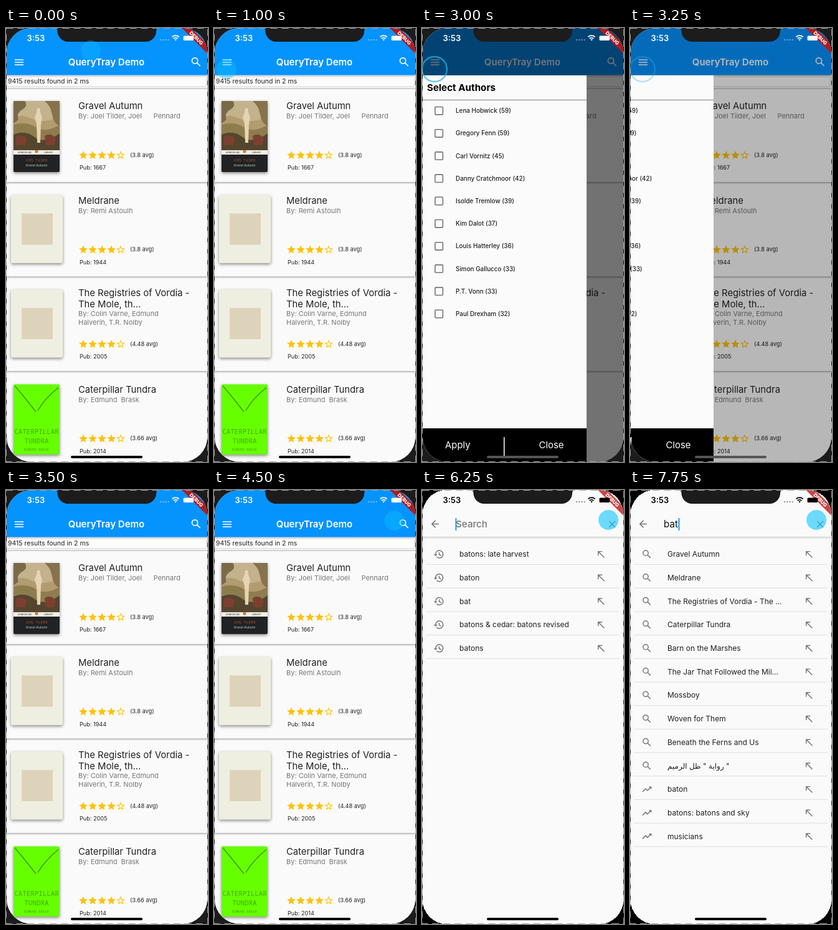
Animation, 324 px wide and 696 px high, one loop 8000 ms. Source, as an HTML page:

```html
<!DOCTYPE html>
<html lang="en">
<head>
<meta charset="utf-8">
<title>Book finder</title>
<style>
  html, body { margin: 0; width: 100%; height: 100%; overflow: hidden; background: #1c1c1c; }
  svg { display: block; }
  #stage { width: 100vw; height: 100vh; }
  text { font-family: Inter, "Noto Sans", "DejaVu Sans", sans-serif; white-space: pre; }
  .mid { text-anchor: middle; }
  .line { fill: none; stroke: currentColor; stroke-width: 2; }
  .cover { filter: drop-shadow(0 2px 2.5px rgba(0, 0, 0, .45)); }
</style>
</head>
<body>
<svg id="stage" viewBox="0 0 324 696"></svg>
<script>
const LOOP = 8000;

// ---- drawing helpers ----
const text = (x, y, size, str, fill = '#212121', more = '') =>
  `<text x="${x}" y="${y}" font-size="${size}" fill="${fill}" ${more}>${str.replace(/&/g, '&amp;')}</text>`;
const rect = (x, y, w, h, fill, more = '') =>
  `<rect x="${x}" y="${y}" width="${w}" height="${h}" fill="${fill}" ${more}/>`;
const path = (d, fill, more = '') => `<path d="${d}" fill="${fill}" ${more}/>`;
const group = (id, body, more = '') => `<g id="${id}" ${more}>${body}</g>`;
const stroke = d => `<path class="line" d="${d}"/>`;

const STAR = 'M12 17.27L18.18 21l-1.64-7.03L22 9.24l-7.19-.61L12 2 9.19 8.63 2 9.24l5.46 4.73L5.82 21z';
const STAR_HOLE = 'M12 15.4l-3.76 2.27 1-4.28-3.32-2.88 4.38-.38L12 6.1l1.71 4.04 4.38.38-3.32 2.88 1 4.28z';
const icons = {
  menu: stroke('M3 7h18M3 12h18M3 17h18'),
  search: stroke('M14 14l5.8 5.8M15 9.5a5.5 5.5 0 1 1-11 0a5.5 5.5 0 1 1 11 0'),
  back: stroke('M20 12H5.5M12.7 4.7L5.4 12l7.3 7.3'),
  close: stroke('M5.7 5.7l12.6 12.6M18.3 5.7L5.7 18.3'),
  insert: stroke('M15 6H6v9M6.5 6.5l12.8 12.8'),
  trend: stroke('M2.7 17.3l6.7-6.7 4 4L20.5 7.5') + path('M16 6h6v6z', 'currentColor'),
  history: stroke('M5 12a8 8 0 1 1 2.34 5.66M12.75 8v4.6l4 2.4') + path('M1 12h8l-4 4z', 'currentColor'),
  star: path(STAR, 'currentColor'),
  hollow: path(STAR + STAR_HOLE, 'currentColor', 'fill-rule="evenodd"')
};
const icon = (name, cx, cy, size, color) =>
  `<g color="${color}" transform="translate(${cx - size / 2} ${cy - size / 2}) scale(${size / 24})">${icons[name]}</g>`;

// ---- covers, drawn relative to the card top ----
const painting = () => `<g class="cover">
  ${rect(12, 20, 74, 114, '#202224', 'rx="2"')}
  ${rect(12, 20, 74, 79, '#b39b70')}
  ${path('M12 20H86V44Q62 58 40 48T12 52Z', '#c3b28c')}
  ${path('M12 20H30Q36 28 26 34T20 50L12 56Z', '#7a6a48')}
  ${path('M62 20H86V60Q76 56 74 42T62 20Z', '#86734d')}
  ${path('M12 58Q32 52 48 62T86 58V99H12Z', '#8d7d4e')}
  ${path('M12 74Q30 66 46 78T86 72V99H12Z', '#54452f')}
  ${path('M16 78q10-6 18 3l-4 10H16zM62 76q10-6 18 4l-3 11H64z', '#7d4030')}
  ${path('M50 36a2.8 2.8 0 1 1 4.4 0l3.6 11-2 10-1 30h-5l-1-30-3-10z', '#e6d3b2')}
  ${rect(12, 99, 74, 7, '#f2efe6')}
  <circle cx="49" cy="101" r="2.6" fill="#d97a2a"/>
  ${text(30, 104.3, 3.6, 'HARBORLINE', '#333', 'class="mid"')}
  ${text(68, 104.3, 3.6, 'LIBRARY', '#333', 'class="mid"')}
  ${text(49, 117, 5, 'JOEL TILDER', '#c0552a', 'class="mid" letter-spacing=".4"')}
  ${text(49, 125, 5, 'Gravel Autumn', '#ccc', 'class="mid" font-style="italic"')}
</g>`;
const blank = () => `<g class="cover">${rect(8, 19.5, 83, 109, '#eeefe0', 'rx="3"')}</g>` +
  rect(25, 49, 50, 50, '#dcd3ba');
const green = () => {
  const word = (y, size, s) => text(49, y, size, s, '#4aa810',
    'class="mid" style="font-family:\'Noto Sans Mono\',monospace"');
  return `<g class="cover">${rect(12, 20, 74, 112.5, '#66ff00', 'rx="2"')}</g>
    ${path('M14 22Q34 46 48 64M84 25Q62 43 51 62', 'none', 'stroke="#3f9316" stroke-width="1.4"')}
    ${word(99, 10.8, 'CATERPILLAR')}${word(114.5, 10.8, 'TUNDRA')}${word(126, 5.6, 'EDMUND BRASK')}`;
};

// ---- book list ----
const books = [
  { cover: painting, title: ['Gravel Autumn'], by: ['By: Joel Tilder, Joel      Pennard'], avg: '3.8', year: 1667 },
  { cover: blank, title: ['Meldrane'], by: ['By: Remi Astoulh'], avg: '3.8', year: 1944 },
  { cover: blank, title: ['The Registries of Vordia -', 'The Mole, th...'],
    by: ['By: Colin Varne, Edmund', 'Halverin, T.R. Nolby'], avg: '4.48', year: 2005 },
  { cover: green, title: ['Caterpillar Tundra'], by: ['By: Edmund  Brask'], avg: '3.66', year: 2014 }
];
const card = (b, i) => {
  const two = b.title.length > 1;
  const stars = [0, 1, 2, 3, 4].map(n => icon(n < 4 ? 'star' : 'hollow', 124 + n * 15, 106.8, 16.4, '#ffc107')).join('');
  return `<g transform="translate(0 ${97 + i * 151.5})">
    ${b.cover()}
    ${b.title.map((s, n) => text(116, (two ? 29.7 : 33) + n * 18, 14.8, s)).join('')}
    ${b.by.map((s, n) => text(116, (two ? 62 : 48) + n * 13.7, 11, s, '#777')).join('')}
    ${stars}
    ${text(199, 109.6, 9.2, `(${b.avg} avg)`)}
    ${text(118, 130.2, 9.1, 'Pub: ' + b.year)}
    ${rect(0, 150, 324, 1.5, '#b5b5b5')}${rect(0, 152, 324, 1, '#dedede')}
  </g>`;
};
const home = rect(0, 0, 324, 696, '#fafafa') +
  rect(1.5, 78, 320, 16, '#fcfcfc', 'rx="2" stroke="#cfcfcf"') +
  text(3, 88.6, 10.5, '9415 results found in 2 ms') +
  rect(0, 96.5, 324, 1.2, '#b5b5b5') +
  books.map(card).join('') +
  rect(0, 75, 324, 2, '#000', 'opacity=".16"') +
  rect(0, 0, 324, 75.5, '#0593fe') +
  icon('menu', 21, 55, 19, '#fff') +
  text(161, 60.2, 15, 'QueryTray Demo', '#fff', 'class="mid" font-weight="600"') +
  icon('search', 305, 54.5, 20, '#fff');

// ---- author drawer ----
const authors = ['Lena Hobwick (59)', 'Gregory Fenn (59)', 'Carl Vornitz (45)', 'Danny Cratchmoor (42)',
  'Isolde Tremlow (39)', 'Kim Dalot (37)', 'Louis Hatterley (36)', 'Simon Gallucco (33)',
  'P.T. Vonn (33)', 'Paul Drexham (32)'];
const author = (name, i) => {
  const y = 132.5 + i * 36.2;
  return rect(21, y - 6, 12.4, 12.4, 'none', 'rx="1" stroke="#757575" stroke-width="1.6"') +
    text(54, y + 3.6, 9.9, name, '#212121', 'font-weight="500"');
};
const drawer = rect(0, 76, 264, 620, '#fbfbfb') +
  rect(0, 114.6, 264, 1.6, '#a8a8a8') + rect(0, 116.2, 264, 1, '#e0e0e0') +
  text(8, 101.4, 15.2, 'Select Authors', '#000', 'font-weight="700"') +
  group('authors', authors.map(author).join('')) +
  `<g transform="translate(132 379)">${group('spinner',
    path('M9.1-10.9A14.2 14.2 0 0 1 1 14.2', 'none', 'stroke="#0593fe" stroke-width="3"'))}</g>` +
  rect(0, 642, 264, 54, '#000') +
  text(37, 674.3, 14.9, 'Apply', '#fff') + text(187.5, 674.3, 14.9, 'Close', '#fff') +
  rect(131, 656, 1.5, 30, '#fff');

// ---- search page ----
const row = (name, kind, i) => {
  const y = 103 + i * 37.7;
  return icon(kind, 27, y, 18, '#757575') + text(60, y + 4.2, 12, name) +
    icon('insert', 287, y, 17.5, '#757575') + rect(6, y + 16, 311, 1, '#dedede');
};
const recent = ['batons: late harvest', 'baton', 'bat', 'batons & cedar: batons revised', 'batons'];
const found = ['Gravel Autumn', 'Meldrane', 'The Registries of Vordia - The ...', 'Caterpillar Tundra',
  'Barn on the Marshes', 'The Jar That Followed the Mil...', 'Mossboy', 'Woven for Them',
  'Beneath the Ferns and Us', 'رواية " ظل الرميم "', 'baton', 'batons: batons and sky', 'musicians'];
const field = (id, s) => group(id, text(54, 60.2, 15.2, s, '#111'));
const search = rect(0, 0, 324, 696, '#fafafa') +
  rect(0, 75, 324, 1.4, '#cdcdcd') + rect(0, 76.4, 324, 2, '#ececec') +
  icon('back', 21, 54.5, 18.5, '#757575') + icon('close', 305, 55, 19, '#757575') +
  group('hint', text(54, 60.2, 15.2, 'Search', '#777', 'font-weight="500"')) +
  field('typed1', 'b') + field('typed2', 'ba') + field('typed3', 'bat') +
  group('caret', rect(0, 45, 1.8, 20, '#0593fe')) +
  group('recent', recent.map((s, i) => row(s, 'history', i)).join('')) +
  group('found', found.map((s, i) => row(s, i < 10 ? 'search' : 'trend', i)).join(''));

// ---- phone ----
const ribbon = `<g transform="translate(305.4 16) rotate(45)">
  ${group('ribbon', '<rect x="-36" y="-5.2" width="72" height="10.4"/>')}
  ${text(0, 2.8, 7.8, 'DEBUG', '#fff', 'class="mid" font-weight="800"')}</g>`;
const signal = [0, 1, 2, 3].map(n => `<circle cx="${248 + n * 4.2}" cy="19" r="1.2" opacity=".4"/>`).join('');
const wifi = '<path d="M266.5 14.4a8 8 0 0 1 11 0M268.8 17a4.8 4.8 0 0 1 6.4 0" fill="none" stroke="currentColor" stroke-width="1.8"/>' +
  '<path d="M270.3 18.6a2.5 2.5 0 0 1 3.4 0L272 20.6z"/>';
const status = `<g fill="currentColor">
  ${text(33.5, 21, 13, '3:53', 'currentColor', 'font-weight="600"')}${signal}${wifi}
  <rect x="284.5" y="12.5" width="16.5" height="7.5" rx="1.6"/></g>`;

document.getElementById('stage').innerHTML = `
  <clipPath id="screen"><rect x="1" width="322" height="696" rx="40"/></clipPath>
  ${rect(0, 0, 324, 696, '#1c1c1c')}
  <g clip-path="url(#screen)">
    ${home}
    ${group('scrim', rect(0, 0, 324, 696, '#000'))}
    ${group('drawer', drawer)}
    ${group('search', search)}
    ${ribbon}
  </g>
  ${path('M77 0Q82.5 0 82.5 5A17 17 0 0 0 99.5 22H224A17 17 0 0 0 241 5Q241 0 246.5 0Z', '#1c1c1c')}
  ${group('status', status)}
  ${group('bar', '<rect x="104" y="686" width="115" height="4" rx="2"/>')}
  ${group('ring', '<circle cx="20" cy="66" r="20" fill="none" stroke="#2bb4e6" stroke-width="2.4"/>')}
  ${group('dot', '<circle r="16" fill="#0dc5ff"/>')}
  <rect x=".5" y=".5" width="323" height="695" fill="none" stroke="#a9a9a9" stroke-dasharray="11 7"/>`;

// ---- timeline: held poses, in ms ----
const opacity = v => `opacity:${v}`;
const shift = x => `transform:translate(${x}px,0)`;
const dot = (x, y, a) => `transform:translate(${x}px,${y}px);opacity:${a}`;
const caret = (x, a) => `transform:translate(${x}px,0);opacity:${a}`;
const during = (from, to) => ({ 0: opacity(0), [from]: opacity(1), ...(to < LOOP && { [to]: opacity(0) }) });

const tracks = {
  drawer: { 0: shift(-270), 1500: shift(-9), 1750: shift(0), 3250: shift(-130), 3500: shift(-270) },
  scrim: { 0: opacity(0), 1500: opacity(.5), 1750: opacity(.54), 3250: opacity(.27), 3500: opacity(0) },
  spinner: { 0: 'opacity:1;transform:rotate(0deg)', 1750: 'opacity:1;transform:rotate(130deg)', 2000: 'opacity:0' },
  authors: during(2000, LOOP),
  search: { 0: opacity(0), 5500: opacity(.5), 5750: opacity(1) },
  hint: { 0: opacity(1), 6750: opacity(0) },
  typed1: during(6750, 7000),
  typed2: during(7000, 7250),
  typed3: during(7250, LOOP),
  caret: { 0: caret(53.5, 1), 6000: caret(53.5, 0), 6250: caret(53.5, 1), 6500: caret(53.5, 0),
    6750: caret(63.6, 1), 7000: caret(72, 1), 7250: caret(77.6, 1) },
  recent: { 0: opacity(1), 7250: opacity(0) },
  found: during(7500, LOOP),
  ribbon: { 0: 'fill:#b01c20', 5500: 'fill:#c44848' },
  status: { 0: 'color:#fff', 5500: 'color:#000' },
  bar: { 0: 'fill:#000', 1500: 'fill:#555', 3500: 'fill:#000' },
  ring: { 0: opacity(0), 1500: opacity(.35), 1750: opacity(0), 3000: opacity(.7), 3250: opacity(.35), 3500: opacity(0) },
  dot: { 0: dot(136, 36, .3), 250: dot(88, 50, .35), 500: dot(42, 61, .4), 750: dot(20, 66, .4),
    1500: dot(20, 66, 0), 3750: dot(60, 62, .2), 4000: dot(140, 57, .3), 4250: dot(235, 52, .35),
    4500: dot(289, 49, .4), 4750: dot(299, 48, .4), 5500: dot(299, 48, .6) }
};

const css = Object.entries(tracks).map(([id, poses]) => {
  const keys = Object.entries(poses).map(([ms, pose]) => `${ms / LOOP * 100}%{${pose}}`);
  const last = Object.values(poses).pop();
  return `@keyframes ${id}{${keys.join('')}100%{${last}}}#${id}{animation:${id} ${LOOP}ms step-end infinite}`;
}).join('\n');
document.head.appendChild(document.createElement('style')).textContent = css;
</script>
</body>
</html>
```
